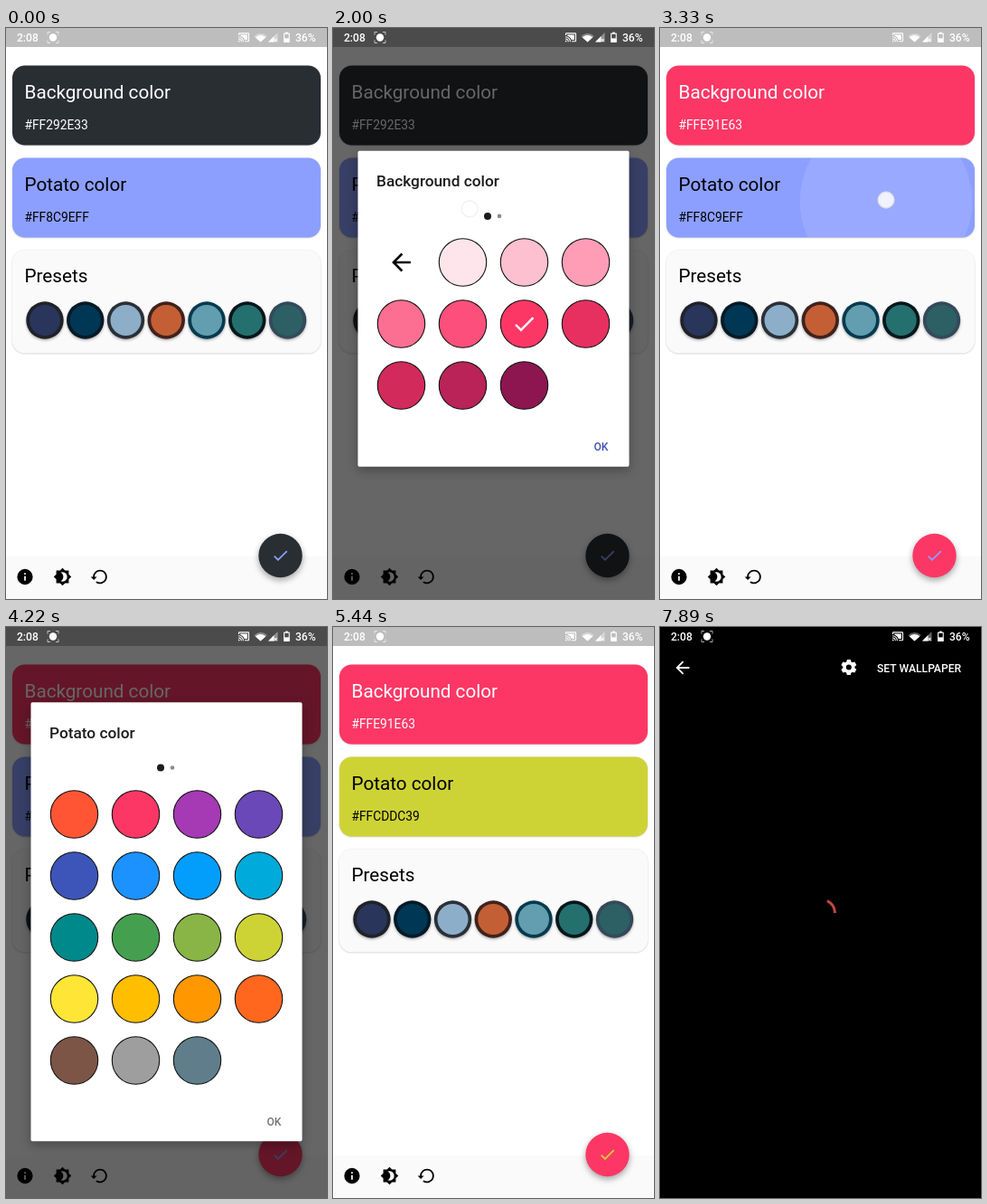
Animation, 355 px wide and 631 px high, one loop 8000 ms. Source, as an HTML page with a canvas:

```html
<!DOCTYPE html>
<html lang="en">
<head>
<meta charset="utf-8">
<title>Color picker</title>
<style>
html, body { margin: 0; width: 100%; height: 100%; overflow: hidden; background: #fff; }
canvas { display: block; width: 100vw; height: 100vh; }
</style>
</head>
<body>
<canvas id="stage"></canvas>
<script>
const W = 355, H = 631, LOOP = 8000;
const canvas = document.getElementById('stage');
const ctx = canvas.getContext('2d');
const ratio = Math.max(1, window.devicePixelRatio || 1);
canvas.width = W * ratio;
canvas.height = H * ratio;

const PINK = '#fc3765', LIME = '#ced335';
const palette = ['#ff5535', PINK, '#a53ab4', '#6a48b8', '#3d55b9', '#1b92ff', '#039dfb', '#00aada',
  '#00898a', '#44a04e', '#88b546', LIME, '#ffe636', '#ffbe00', '#ff9800', '#ff671f',
  '#7d5546', '#9e9e9e', '#607d8b'];
const pinks = ['#fee5ec', '#fdc0d0', '#fe9db5', '#fd6f92', '#fd4f7b', PINK, '#e73060', '#d22a5b', '#b92357', '#8d1650'];
const limes = ['#f9fbe7', '#f1f3c4', '#e7ea9c', '#dde076', '#d5da56', LIME, '#c1c332', '#b0af2c', '#9f9826', '#837318'];
const presets = [['#29355a', '#1f2228'], ['#003755', '#061a27'], ['#8daec8', '#2a3038'], ['#c45f35', '#40221c'],
  ['#629eaf', '#063a4f'], ['#24706f', '#08171c'], ['#2c6064', '#34495a']];

const dialogs = [
  { title: 'Background color', open: 740, sub: 1890, close: 2700, shades: pinks, check: '#fff' },
  { title: 'Potato color', open: 3480, sub: 4640, close: 5230, shades: limes, check: '#000' }
];
// x, y, press time, release time
const touches = [[215, 92, 150, 660], [151, 200, 1670, 1950], [297, 463, 2540, 2670], [250, 190, 3200, 3400],
  [281, 345, 4440, 4620], [297, 463, 5050, 5190], [303, 583, 7220, 7410]];

const icons = {
  info: 'M12 2a10 10 0 1 0 0 20a10 10 0 0 0 0-20zm1 15h-2v-6h2zm0-8h-2V7h2z',
  night: 'M20 8.7V4h-4.7L12 .7 8.7 4H4v4.7L.7 12 4 15.3V20h4.7l3.3 3.3 3.3-3.3H20v-4.7l3.3-3.3zM12 18c-.9 0-1.7-.2-2.5-.55a6 6 0 0 0 0-10.9A6 6 0 1 1 12 18z',
  restore: 'M12 3a9 9 0 0 0-9 9H0l4 4 4-4H5a7 7 0 1 1 2.94 5.7l-1.42 1.44A9 9 0 1 0 12 3z',
  check: 'M9 16.2L4.8 12l-1.4 1.4L9 19 21 7l-1.4-1.4z',
  back: 'M20 11H7.8l5.6-5.6L12 4l-8 8 8 8 1.4-1.4L7.8 13H20z',
  cast: 'M21 3H3a2 2 0 0 0-2 2v3h2V5h18v14h-7v2h7a2 2 0 0 0 2-2V5a2 2 0 0 0-2-2zM1 18v3h3a3 3 0 0 0-3-3zm0-4v2a5 5 0 0 1 5 5h2a7 7 0 0 0-7-7zm0-4v2a9 9 0 0 1 9 9h2A11 11 0 0 0 1 10zM5 7v1.6c4 1.3 7.1 4.4 8.4 8.4H19V7z'
};
for (const name in icons) icons[name] = new Path2D(icons[name]);

const progress = (t, start, length) => Math.min(1, Math.max(0, (t - start) / length));

function icon(name, x, y, color, scale = 0.863) {
  ctx.save();
  ctx.translate(x, y);
  ctx.scale(scale, scale);
  ctx.translate(-12, -12);
  ctx.fillStyle = color;
  ctx.fill(icons[name], 'evenodd');
  ctx.restore();
}

function text(value, x, y, size, color, weight = 400) {
  ctx.font = `${weight} ${size}px Roboto, sans-serif`;
  ctx.fillStyle = color;
  ctx.fillText(value, x, y);
}

function circle(x, y, r, fill, stroke, width = 1) {
  ctx.beginPath();
  ctx.arc(x, y, r, 0, 7);
  if (fill) { ctx.fillStyle = fill; ctx.fill(); }
  if (stroke) { ctx.strokeStyle = stroke; ctx.lineWidth = width; ctx.stroke(); }
}

function rect(x, y, w, h, color) {
  ctx.fillStyle = color;
  ctx.fillRect(x, y, w, h);
}

function polygon(color, ...points) {
  ctx.beginPath();
  points.forEach(([x, y]) => ctx.lineTo(x, y));
  ctx.fillStyle = color;
  ctx.fill();
}

function shadowed(blur, offset, alpha, draw) {
  ctx.save();
  ctx.shadowColor = `rgba(0,0,0,${alpha})`;
  ctx.shadowBlur = blur * ratio;
  ctx.shadowOffsetY = offset * ratio;
  draw();
  ctx.restore();
}

function roundRect(x, y, w, h, r, color) {
  ctx.beginPath();
  ctx.roundRect(x, y, w, h, r);
  ctx.fillStyle = color;
  ctx.fill();
}

function card(y, h, color) {
  shadowed(2, 0.6, 0.22, () => roundRect(7, y, 341, h, 14, color));
}

function ripple(t, y, start, x, color) {
  const grow = progress(t, start, 400), fade = 1 - progress(t, start + 500, 200);
  if (!grow || !fade) return;
  ctx.save();
  ctx.beginPath();
  ctx.roundRect(7, y, 341, 88, 14);
  ctx.clip();
  ctx.globalAlpha = 0.1 * fade;
  circle(x, y + 48, 20 + 230 * grow, color);
  ctx.restore();
}

function drawMain(t) {
  const pickedBack = t >= dialogs[0].close, pickedPotato = t >= dialogs[1].close;
  const back = pickedBack ? PINK : '#292e33';
  const potato = pickedPotato ? LIME : '#8c9fff';
  rect(0, 0, W, H, '#fff');
  rect(0, 0, W, 21, '#bdbdbd');

  card(41.5, 88, back);
  ripple(t, 41.5, 150, 215, '#fff');
  text('Background color', 20.5, 77.5, 20.7, '#fff');
  text(pickedBack ? '#FFE91E63' : '#FF292E33', 20.5, 112, 13.8, '#fff');

  card(143.5, 88, potato);
  ripple(t, 143.5, 3200, 250, '#fff');
  text('Potato color', 20.5, 179.5, 20.7, '#000');
  text(pickedPotato ? '#FFCDDC39' : '#FF8C9EFF', 20.5, 214, 13.8, '#000');

  card(245.5, 114, '#fafafa');
  text('Presets', 20.5, 281, 20.7, '#000');
  presets.forEach(([inner, outer], i) => {
    const x = 43 + i * 44.75;
    shadowed(3, 1.5, 0.3, () => circle(x, 323, 20.7, outer));
    circle(x, 323, 17, inner);
  });

  rect(0, 584, W, 47, '#fafafa');
  icon('info', 21, 606.5, '#000');
  icon('night', 62.5, 606.5, '#000');
  icon('restore', 104, 606.5, '#000');
  shadowed(7, 3, 0.35, () => circle(303.5, 583, 24.2, back));
  icon('check', 303.5, 583, potato);
}

function swatch(index, firstRow, color) {
  const x = 75.5 + (index % 4) * 68, y = firstRow + Math.floor(index / 4) * 68;
  circle(x, y, 26.2, color, '#111', 1.1);
  return [x, y];
}

function drawDialog(t, d) {
  const opening = progress(t, d.open, 180), closing = 1 - progress(t, d.close, 190);
  if (!opening || !closing) return;
  rect(0, 0, W, H, `rgba(0,0,0,${0.6 * opening * closing})`);

  const sub = t >= d.sub, top = sub ? 135.7 : 83.3, height = sub ? 349 : 485;
  ctx.save();
  ctx.globalAlpha = Math.min(1, opening * 1.25) * closing;
  shadowed(12, 4, 0.3, () => roundRect(27.5, top, 300, height, 1.7, '#fff'));
  text(d.title, 48, top + 39.7, 17.25, '#1c1c1c', 500);
  circle(171, top + 72.2, 4, '#1c1c1c');
  circle(184, top + 72.2, 2.3, '#8c8c8c');
  if (sub) {
    icon('back', 75.5, 259, '#000', 1.3);
    d.shades.forEach((color, i) => {
      const [x, y] = swatch(i + 1, 259, color);
      if (i === 5) icon('check', x, y, d.check, 1.2);
    });
  } else {
    palette.forEach((color, i) => swatch(i, 207, color));
  }
  text('OK', 288.5, top + height - 17.3, 12.1, sub ? '#3f51b5' : '#757575', 500);
  ctx.restore();
}

function drawGear(x, y) {
  ctx.save();
  ctx.translate(x, y);
  for (let i = 0; i < 6; i++) {
    ctx.rotate(Math.PI / 3);
    polygon('#fff', [-2.8, -5], [-2, -8.6], [2, -8.6], [2.8, -5]);
  }
  circle(0, 0, 4.8, null, '#fff', 3.6);
  ctx.restore();
}

function drawPreview(t) {
  const alpha = progress(t, 7450, 190);
  if (!alpha) return;
  ctx.save();
  ctx.globalAlpha = alpha;
  rect(0, 0, W, H, '#000');
  icon('back', 25, 45, '#fff', 0.93);
  drawGear(208.8, 44.5);
  text('SET WALLPAPER', 240, 49.5, 12.1, '#fff', 500);
  const head = -0.03 + (t - 7890) / 1333 * 2 * Math.PI;
  const sweep = 1.08 + (t - 7890) / 700;
  ctx.beginPath();
  ctx.arc(178, 316.5, 15.5, head - Math.max(0.15, sweep), head);
  ctx.strokeStyle = '#c4473f';
  ctx.lineWidth = 3;
  ctx.stroke();
  ctx.restore();
}

function wifiFan(radius, color) {
  ctx.beginPath();
  ctx.moveTo(281.5, 15.5);
  ctx.arc(281.5, 15.5, radius, -Math.PI * 0.77, -Math.PI * 0.23);
  ctx.fillStyle = color;
  ctx.fill();
}

function drawStatus() {
  text('2:08', 12, 15, 12.1, '#fff', 500);
  circle(52, 10.5, 4.2, '#fff');
  ctx.save();
  ctx.strokeStyle = 'rgba(255,255,255,.65)';
  ctx.lineWidth = 1;
  ctx.setLineDash([3, 6, 3, 0]);
  ctx.strokeRect(46, 4.5, 12, 12);
  ctx.restore();

  icon('cast', 263, 10.3, '#fff', 0.55);
  wifiFan(9.6, 'rgba(255,255,255,.35)');
  wifiFan(7.6, '#fff');
  polygon('rgba(255,255,255,.4)', [300.5, 5], [300.5, 15.5], [290, 15.5]);
  polygon('#fff', [296.5, 9], [296.5, 15.5], [290, 15.5]);
  text('×', 296.2, 16, 7.5, '#fff', 700);
  ctx.strokeStyle = '#fff';
  ctx.lineWidth = 1.1;
  ctx.strokeRect(307.6, 6.2, 5.6, 9.2);
  rect(309, 4.6, 2.8, 1.6, '#fff');
  rect(307.6, 11.4, 5.6, 4, '#fff');
  text('36%', 320, 15, 12.1, '#fff', 500);
}

function drawTouches(t) {
  for (const [x, y, press, release] of touches) {
    const alpha = progress(t, press - 1, 60) * (1 - progress(t, release, 100));
    if (!alpha) continue;
    ctx.save();
    ctx.globalAlpha = alpha * 0.85;
    circle(x, y, 9, '#fff', '#dedede', 1.4);
    ctx.restore();
  }
}

function draw(t) {
  ctx.setTransform(ratio, 0, 0, ratio, 0, 0);
  drawMain(t);
  dialogs.forEach(d => drawDialog(t, d));
  drawPreview(t);
  drawStatus();
  drawTouches(t);
}

const start = performance.now();
function tick() {
  draw((performance.now() - start) % LOOP);
  requestAnimationFrame(tick);
}
tick();
</script>
</body>
</html>
```
